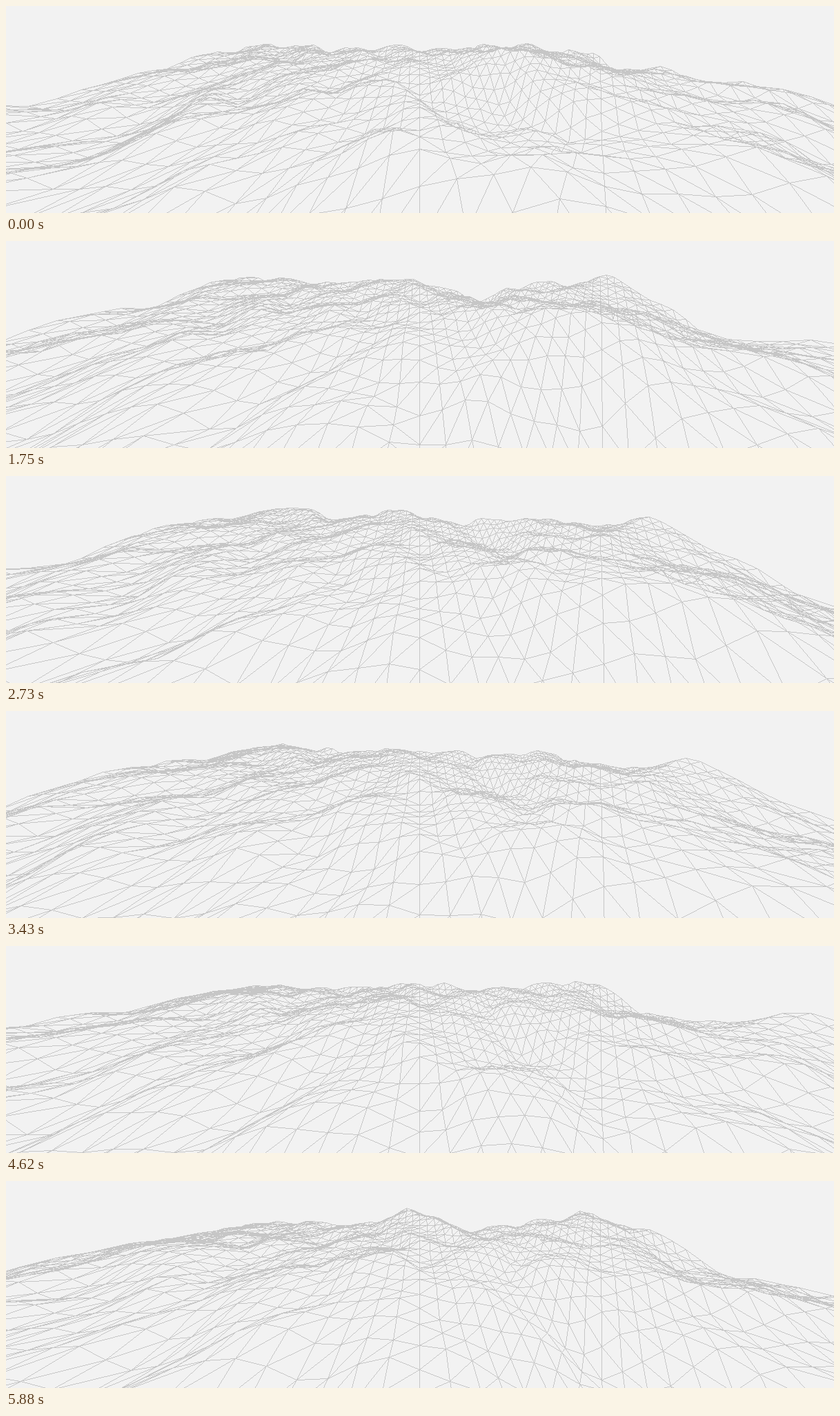
Recreate the animation shown at these times as an HTML page with a canvas. Size 1200 by 300 pixels, loop 5.95 s.

```html
<!DOCTYPE html>
<html lang="en">
<head>
<meta charset="utf-8">
<title>Wireframe terrain</title>
<style>
  html, body { margin: 0; width: 100%; height: 100%; overflow: hidden; background: #f2f2f2; }
  canvas { display: block; }
</style>
</head>
<body>
<canvas id="stage" width="1200" height="300"></canvas>
<script>
const W = 1200, H = 300, LOOP = 5950, STEP = 70;
const SPEED = 0.0048;            // grid rows per ms
const FOCAL = 260, HORIZON = 4, CENTER = 599.5;
const HALF = 28, NEAR = 1.85, FAR = 28.85;

// Main landforms: column, row along the flight, drop (negative for hills)
const EYE_HEIGHT = 6.4, SPREAD = 5;
const FORMS = [
  [2, 5, -1.9], [11, 4, -1.6], [6, 13, 2.6], [-20, 12, 1.6], [11, 21, -1.9],
  [27, 25, 2.3], [-26, 33, -1.2], [28, 34, -1.2], [9, 36, 2.7], [-4, 40, -1.1],
  [-21, 43, -1.7], [27, 43, 2], [0, 56, -2.2], [24, 54, -1.6], [8, 58, 1.6]
];

const ctx = document.getElementById('stage').getContext('2d');
const image = ctx.createImageData(W, H);
const pixels = new Uint32Array(image.data.buffer);
const PAPER = 0xfff2f2f2, INK = 0xffc6c6c6;

function ripple(x, w, freq) {
  return Math.sin(freq * x + 1.7 * Math.sin(0.55 * freq * w))
       + Math.sin(freq * w + 1.9 * Math.sin(0.45 * freq * x));
}

// Distance of the ground below the eye
function depth(x, w) {
  let d = EYE_HEIGHT + 0.3 * ripple(x, w, 0.9) + 0.13 * ripple(x, w, 1.7);
  for (const [cx, cw, drop] of FORMS) {
    d += drop * Math.exp(-((x - cx) ** 2 + (w - cw) ** 2) / SPREAD ** 2);
  }
  return d;
}

function project(x, z, travel) {
  const s = FOCAL / z;
  return [Math.floor(CENTER + x * s), Math.floor(HORIZON + depth(x, z + travel) * s)];
}

// Crisp one-pixel line
function line([x0, y0], [x1, y1]) {
  if (Math.max(x0, x1) < 0 || Math.min(x0, x1) >= W || Math.min(y0, y1) >= H) return;
  const n = Math.max(Math.abs(x1 - x0), Math.abs(y1 - y0), 1);
  const dx = (x1 - x0) / n, dy = (y1 - y0) / n;
  for (let i = 0; i <= n; i++) {
    const x = Math.round(x0 + dx * i), y = Math.round(y0 + dy * i);
    if (x >= 0 && x < W && y >= 0 && y < H) pixels[y * W + x] = INK;
  }
}

function draw(t) {
  const travel = t * SPEED;
  let far = null;
  pixels.fill(PAPER);
  for (let z = FAR; z > NEAR - 0.5; z--) {
    const row = [];
    for (let x = -HALF; x <= HALF; x++) row.push(project(x, z, travel));
    row.forEach((p, i) => {
      if (i < row.length - 1) line(p, row[i + 1]);
      if (far) {
        line(p, far[i]);
        if (i < row.length - 1) line(p, far[i + 1]);
      }
    });
    far = row;
  }
  ctx.putImageData(image, 0, 0);
}

let shown = -1;
function tick() {
  const t = Math.floor(performance.now() % LOOP / STEP) * STEP;
  if (t !== shown) draw(shown = t);
  requestAnimationFrame(tick);
}
tick();
</script>
</body>
</html>
```
